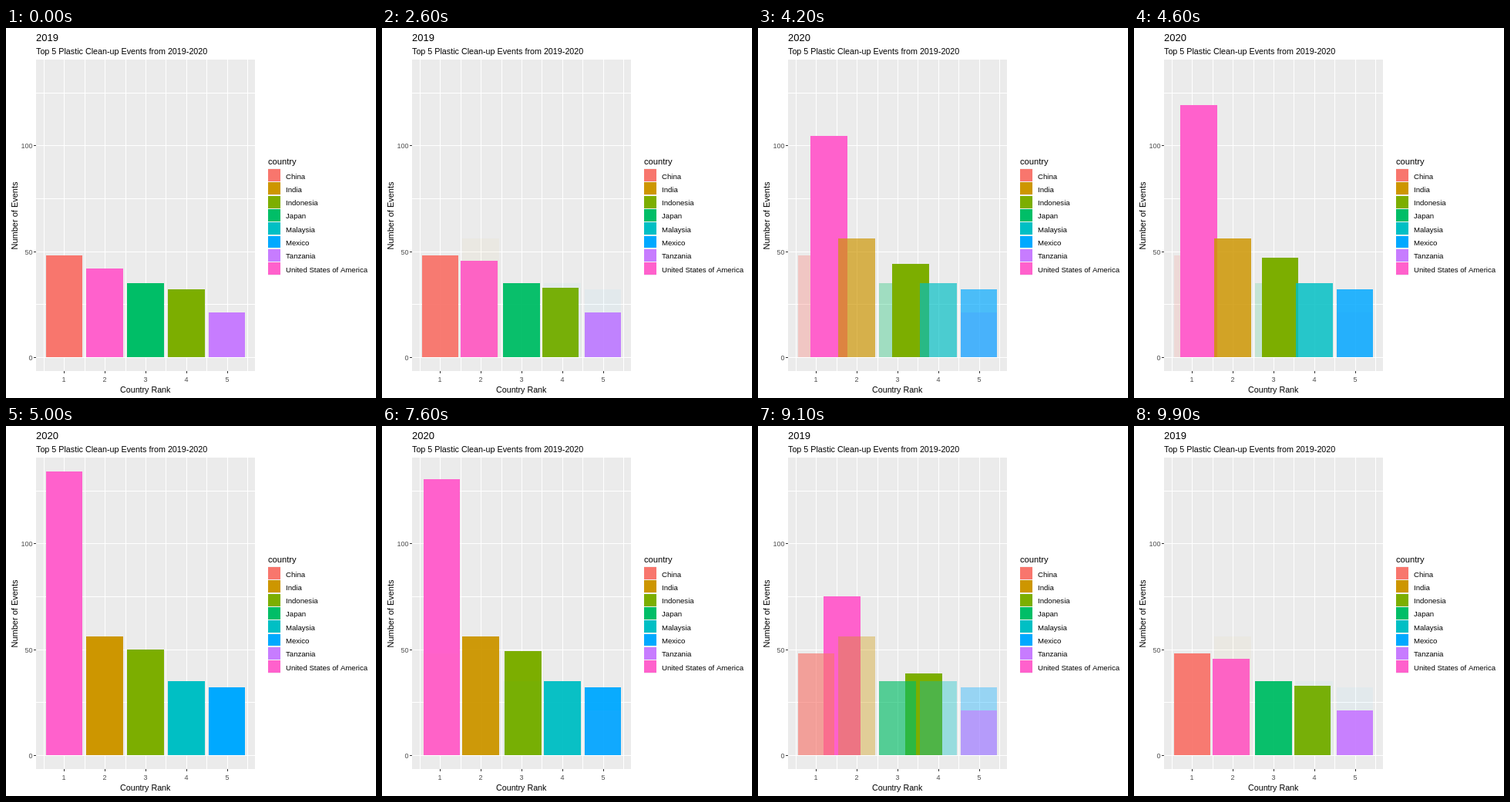
Recreate the animation shown at these times as an HTML page with a canvas. Size 480 by 480 pixels, loop 10 s.

```html
<!DOCTYPE html>
<html lang="en">
<head>
<meta charset="utf-8">
<title>Top 5 Plastic Clean-up Events</title>
<style>
  html, body { margin: 0; width: 100%; height: 100%; overflow: hidden; background: #fff; }
  canvas { display: block; }
</style>
</head>
<body>
<canvas id="chart" width="480" height="480"></canvas>
<script>
const ctx = document.getElementById('chart').getContext('2d');
const FONT = '"Liberation Sans", Arial, sans-serif';
const STEP_MS = 100, STEPS = 100, HALF = 50, HOLD = 25;

const COLORS = {
  'China': '#F8766D',
  'India': '#CD9600',
  'Indonesia': '#7CAE00',
  'Japan': '#00BE67',
  'Malaysia': '#00BFC4',
  'Mexico': '#00A9FF',
  'Tanzania': '#C77CFF',
  'United States of America': '#FF61CC'
};

// [country, rank, events]
const ONLY_2019 = [['China', 1, 48], ['Japan', 3, 35], ['Tanzania', 5, 21]];
const ONLY_2020 = [['India', 2, 56], ['Malaysia', 4, 35], ['Mexico', 5, 32]];
// [country, rank 2019, events 2019, rank 2020, events 2020]
const BOTH = [['United States of America', 2, 42, 1, 134], ['Indonesia', 4, 32, 3, 50]];

const BAR_HALF = 23.77;
const px = rank => 75.3 + (rank - 1) * 52.83;
const py = events => 426.9 - events * 2.744;
const lerp = (a, b, p) => a + (b - a) * p;

function box(color, x0, y0, x1, y1) {
  const [l, t, r, b] = [x0, y0, x1, y1].map(Math.round);
  ctx.fillStyle = color;
  ctx.fillRect(l, t, r - l, b - t);
}

function text(str, x, y, size, color = '#000', align = 'left') {
  ctx.font = `${size}px ${FONT}`;
  ctx.fillStyle = color;
  ctx.textAlign = align;
  ctx.fillText(str, x, y);
}

const hLine = (y, x0, x1, color) => box(color, x0, Math.round(y), x1, Math.round(y) + 1);
const vLine = (x, y0, y1, color) => box(color, Math.round(x), y0, Math.round(x) + 1, y1);

function bar(country, rank, events) {
  const x = px(rank);
  box(COLORS[country], x - BAR_HALF, py(events), x + BAR_HALF, py(0));
}

function fadedBars(rows, alpha) {
  ctx.globalAlpha = alpha;
  rows.forEach(row => bar(...row));
  ctx.globalAlpha = 1;
}

function movingBars(p) {
  BOTH.forEach(([country, r0, e0, r1, e1]) => bar(country, lerp(r0, r1, p), lerp(e0, e1, p)));
}

function panel() {
  box('#EBEBEB', 39, 41, 323, 445);
  for (let e = 0; e <= 125; e += 25) hLine(py(e), 39, 323, '#fff');
  for (let r = 0.5; r <= 5.5; r += 0.5) vLine(px(r), 41, 445, '#fff');
}

function axes() {
  for (const e of [0, 50, 100]) {
    hLine(py(e), 36, 39, '#333');
    text(e, 34.5, Math.round(py(e)) + 4, 9, '#4D4D4D', 'right');
  }
  for (let r = 1; r <= 5; r++) {
    vLine(px(r), 445, 448, '#333');
    text(r, Math.round(px(r)), 459, 9, '#4D4D4D', 'center');
  }
  text('Country Rank', 180.7, 473, 10.7, '#000', 'center');
  ctx.save();
  ctx.translate(15, 243.5);
  ctx.rotate(-Math.PI / 2);
  text('Number of Events', 0, 0, 11, '#000', 'center');
  ctx.restore();
}

function legend() {
  text('country', 340, 177, 11.2);
  Object.entries(COLORS).forEach(([country, color], i) => {
    const y = 182.4 + i * 17.28;
    box('#F2F2F2', 339.6, y, 356.4, y + 17.28);
    box(color, 340, y + 0.7, 356, y + 16.6);
    text(country, 363, Math.round(y + 13.2), 9.6);
  });
}

function draw(ms) {
  const step = Math.floor(ms / STEP_MS) % STEPS;
  const back = step >= HALF;
  const q = Math.max(0, step % HALF - HOLD) / HOLD;
  const p = back ? 1 - q : q;

  ctx.fillStyle = '#fff';
  ctx.fillRect(0, 0, 480, 480);
  panel();
  // Arriving bars always lie on top
  if (back) {
    movingBars(p);
    fadedBars(ONLY_2020, p);
    fadedBars(ONLY_2019, 1 - p);
  } else {
    fadedBars(ONLY_2019, 1 - p);
    movingBars(p);
    fadedBars(ONLY_2020, p);
  }
  axes();
  legend();
  text(p > 0.5 ? '2020' : '2019', 39, 17, 13);
  text('Top 5 Plastic Clean-up Events from 2019-2020', 39, 34, 10.75);
}

function tick(now) {
  draw(Math.max(0, now));
  requestAnimationFrame(tick);
}
draw(0);
requestAnimationFrame(tick);
</script>
</body>
</html>
```
